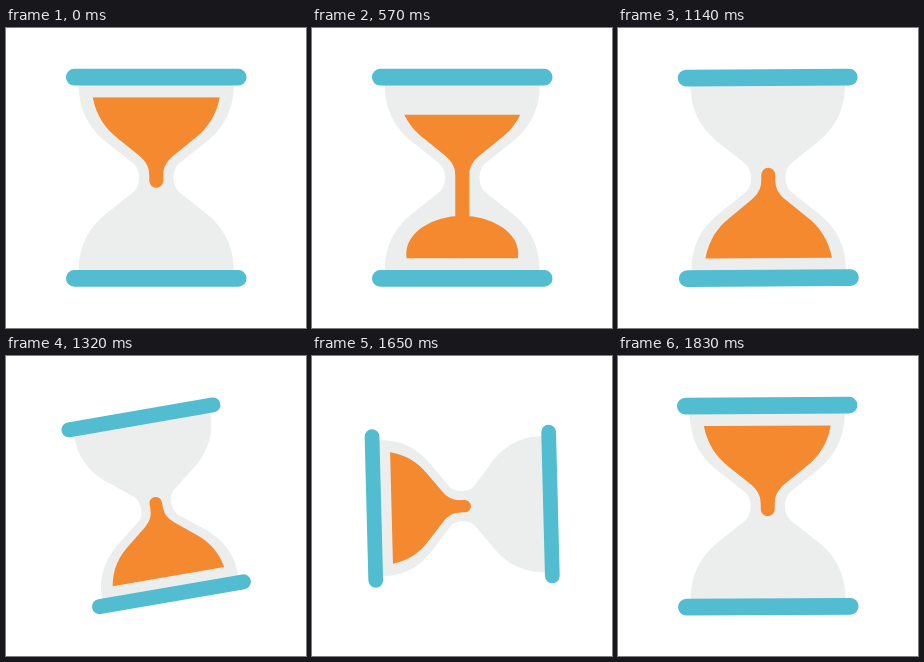
An HTML page with a canvas that plays this animation: 300x300 px, repeating every 1.86 s.

```html
<!DOCTYPE html>
<html lang="en">
<head>
<meta charset="utf-8">
<title>Hourglass</title>
<style>
  html, body { margin: 0; width: 100%; height: 100%; overflow: hidden; background: #fff; }
  canvas { display: block; }
</style>
</head>
<body>
<canvas id="stage" width="300" height="300"></canvas>
<script>
const ctx = document.getElementById('stage').getContext('2d');
const LOOP = 1860, STEP = 30;
const TEAL = '#52bcd1', GLASS = '#eceeee', SAND = '#f58930';

// All shapes are centred on the neck of the hourglass.
const glass = new Path2D(`M-77.5-93C-77.5-66-66-47-44.5-31.5L-22.5-14C-15.5-8-15.5 8-22.5 14
  L-44.5 31.5C-66 47-77.5 66-77.5 93H77.5C77.5 66 66 47 44.5 31.5L22.5 14
  C15.5 8 15.5-8 22.5-14L44.5-31.5C66-47 77.5-66 77.5-93Z`);
const bulb = new Path2D(`M-63.5-80.5C-60-62-51-49-38-39L-17-22C-11-17-7-11-7-3
  H7C7-11 11-17 17-22L38-39C51-49 60-62 63.5-80.5Z`);
const bars = new Path2D();
for (const y of [-109, 92.2]) bars.roundRect(-90.3, y, 180.6, 16.8, 8.4);

const progress = (t, from, to) => Math.min(1, Math.max(0, (t - from) / (to - from)));
const smooth = p => p * p * (3 - 2 * p);
const cubic = p => p < .5 ? 4 * p ** 3 : 1 - 4 * (1 - p) ** 3;

function fill(shape, color) {
  ctx.fillStyle = color;
  ctx.fill(shape);
}

function clipped(region, draw) {
  ctx.save();
  ctx.clip(region);
  draw();
  ctx.restore();
}

function drawSand(t) {
  const drained = t > 1090;

  if (!drained) {
    const level = -80.5 + 17.5 * (t / 570) ** 2.02;
    const below = new Path2D();
    below.rect(-100, level, 200, 100);
    clipped(below, () => fill(bulb, SAND));
  }

  // Stream through the neck
  const tip = 3 + 70.5 * progress(t, 0, 250) ** 2;
  ctx.strokeStyle = SAND;
  ctx.lineWidth = 14;
  ctx.lineCap = 'round';
  ctx.beginPath();
  ctx.moveTo(0, -3);
  ctx.lineTo(0, drained ? 12 : tip);
  ctx.stroke();

  // Growing mound, held inside the lower bulb
  const size = (Math.max(0, t - 210) / 360) ** .75;
  const mound = new Path2D();
  if (drained) mound.rect(-100, -20, 200, 120);
  else mound.ellipse(0, 80.5 - 4.5 * size, 56 * size, 38 * size, 0, 0, 7);
  clipped(mound, () => {
    ctx.scale(1, -1);
    fill(bulb, SAND);
  });
}

function draw(t) {
  const turn = cubic(progress(t, 1430, 1862));
  const angle = -13.5 * smooth(progress(t, 1110, 1430)) + 193.5 * turn;
  const shrink = progress(t, 1100, 1440) ** 2;
  const scale = 1 - .258 * shrink * (1 - turn);

  ctx.fillStyle = '#fff';
  ctx.fillRect(0, 0, 300, 300);
  ctx.save();
  ctx.translate(150, 150);
  ctx.rotate(angle * Math.PI / 180);
  ctx.scale(scale, scale);
  ctx.translate(.25, -.2);
  fill(glass, GLASS);
  drawSand(t);
  fill(bars, TEAL);
  ctx.restore();
}

const start = performance.now();
function tick() {
  const t = (performance.now() - start) % LOOP;
  draw(Math.floor(t / STEP) * STEP);
  requestAnimationFrame(tick);
}
tick();
</script>
</body>
</html>
```
